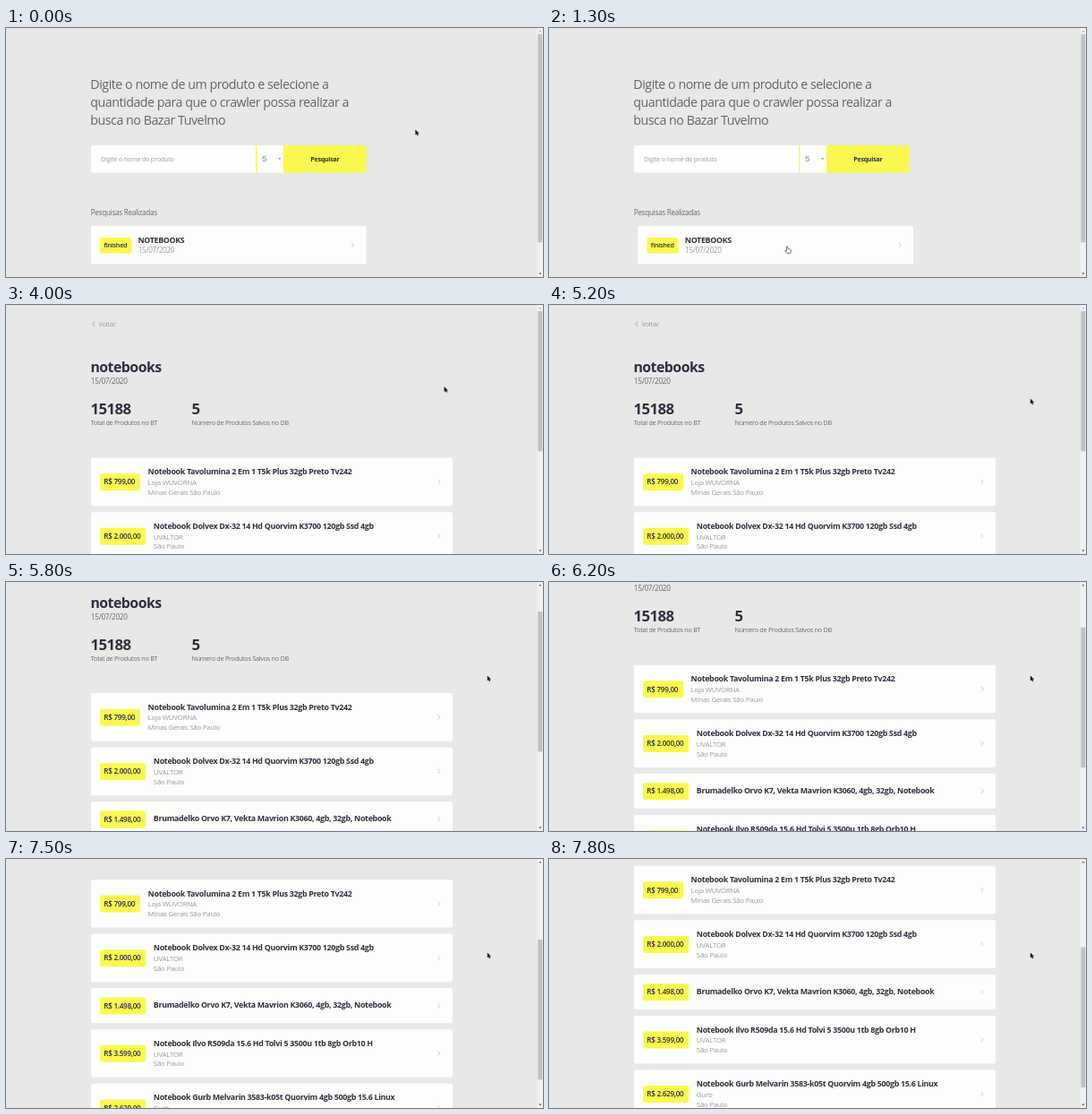
These frames come from a looping animation (600x278 px, 8000 ms). An HTML page:

```html
<!DOCTYPE html>
<html lang="pt-BR">
<head>
<meta charset="utf-8">
<title>Pesquisa de produtos</title>
<style>
  html, body { margin: 0; width: 100%; height: 100%; overflow: hidden; background: #e7e9e6; }
  svg { display: block; width: 100%; height: 100%; }
  text { font-family: "Open Sans", "Noto Sans", sans-serif; white-space: pre; letter-spacing: -.032em; }
</style>
</head>
<body>
<svg id="stage" viewBox="0 0 600 278"></svg>
<script>
const LOOP = 8000, STEP = 100;
const DARK = '#2f2f3d', MID = '#666671', PALE = '#999aa4', YELLOW = '#fcf851', WHITE = '#fcfefb';
const PAGE_SWITCH = 2500, LOADED = 2900, NUDGE = 4.4;

const text = (x, y, size, fill, str, weight = 400) =>
  `<text x="${x}" y="${y}" font-size="${size}" fill="${fill}" font-weight="${weight}">${str}</text>`;
const rect = (x, y, w, h, fill, r = 0) =>
  `<rect x="${x}" y="${y}" width="${w}" height="${h}" rx="${r}" fill="${fill}"/>`;
const chevron = (x, y, dir, color) =>
  `<path d="M${x - dir} ${y - 2.5}l${2.4 * dir} 2.5l${-2.4 * dir} 2.5" fill="none" stroke="${color}" stroke-width=".9"/>`;

function homePage() {
  const title = ['Digite o nome de um produto e selecione a',
    'quantidade para que o crawler possa realizar a', 'busca no Bazar Tuvelmo'];
  return title.map((s, i) => text(94.3, 67.8 + i * 20.2, 14.2, '#636463', s)).join('') +
    rect(95, 131, 220, 30.6, WHITE, 2.2) +
    rect(279, 131, 1.4, 30.6, YELLOW) +
    rect(310, 131, 92.6, 30.6, YELLOW, 2.2) + rect(310, 131, 5, 30.6, YELLOW) +
    text(106, 148.7, 7.24, '#9d9fa5', 'Digite o nome do produto') +
    `<text x="286" y="149.4" font-size="9.8" fill="#8b8c8c" style="font-family:'Liberation Sans',sans-serif">5</text>` +
    '<path d="M304.4 145.2h2.8l-1.4 1.9z" fill="#777"/>' +
    text(340.3, 148.7, 7, DARK, 'Pesquisar', 700) +
    text(94.7, 209.2, 8.1, MID, 'Pesquisas Realizadas') +
    '<g id="search">' + rect(95, 221, 307.6, 42.6, WHITE, 2.2) +
    rect(105, 234, 35.2, 17.4, YELLOW, 2.6) +
    text(109.4, 245, 7.15, DARK, 'finished', 600) +
    text(147.4, 239.9, 8.8, DARK, 'NOTEBOOKS', 700) +
    text(147.7, 251.1, 8.15, PALE, '15/07/2020') +
    chevron(387.3, 242.4, 1, '#c3c4c9') + '</g>';
}

const products = [
  ['799,00', 'Notebook Tavolumina 2 Em 1 T5k Plus 32gb Preto Tv242', 'Loja WUVORNA', 'Minas Gerais São Paulo'],
  ['2.000,00', 'Notebook Dolvex Dx-32 14 Hd Quorvim K3700 120gb Ssd 4gb', 'UVALTOR', 'São Paulo'],
  ['1.498,00', 'Brumadelko Orvo K7, Vekta Mavrion K3060, 4gb, 32gb, Notebook'],
  ['3.599,00', 'Notebook Ilvo R509da 15.6 Hd Tolvi 5 3500u 1tb 8gb Orb10 H', 'UVALTOR', 'São Paulo'],
  ['2.629,00', 'Notebook Gurb Melvarin 3583-k05t Quorvim 4gb 500gb 15.6 Linux', 'Gurb', 'São Paulo']
];

function productCards() {
  let y = 170.6;
  return products.map(([price, name, shop, place], i) => {
    const h = shop ? 53.6 : 39, mid = y + h / 2;
    const w = price.length > 6 ? 51.2 : 45, x = 113.8 + w;
    const card = `<g id="card${i}">` + rect(95, y, 404, h, WHITE, 2.2) +
      rect(105, mid - 9.2, w, 19, YELLOW, 2.8) +
      text(109.3, mid + 3, 8.1, DARK, 'R$ ' + price, 600) +
      text(x - .2, shop ? mid - 8.2 : mid + 2.6, 8.82, DARK, name, 700) +
      (shop ? text(x - .2, mid + 3.5, 7.95, PALE, shop) + text(x - .2, mid + 14.4, 7.95, PALE, place) : '') +
      chevron(483.7, mid, 1, '#c3c4c9') + '</g>';
    y += h + 7;
    return card;
  }).join('');
}

const stage = document.getElementById('stage');
stage.innerHTML = rect(0, 0, 600, 278, '#e7e9e6') +
  `<g id="home">${homePage()}</g>
  <g id="result">
    <g id="back">${chevron(98.2, 21.5, -1, PALE)}${text(103.4, 24.1, 7.6, PALE, 'Voltar')}</g>
    <g id="data">
      ${text(94.4, 75.1, 15.85, DARK, 'notebooks', 700)}
      ${text(94.8, 88.2, 8.2, MID, '15/07/2020')}
      ${text(94.5, 122.3, 16.7, DARK, '15188', 700)}
      ${text(207.6, 122.3, 16.7, DARK, '5', 700)}
      ${text(94.8, 134.2, 7.18, MID, 'Total de Produtos no BT')}
      ${text(207.5, 134.2, 7.18, MID, 'Número de Produtos Salvos no DB')}
      ${productCards()}
    </g>
  </g>
  <g id="bar">
    ${rect(593.6, 0, 6.4, 278, '#f1f2f0')}
    <rect id="thumb" x="594.3" width="5" fill="#c1c2c0"/>
    <path id="up" d="M595.3 4.3l1.5-1.9l1.5 1.9z"/>
    <path d="M595.3 273.6l1.5 1.9l1.5-1.9z" fill="#505050"/>
  </g>
  <circle id="ring" cx="264" cy="246" r="6.6" fill="none" stroke="#c8383c" stroke-width="1"/>
  <path id="arrow" d="M0 0v5l1.2-1.1l.9 2l.9-.4l-.9-1.9h1.6z" fill="#111" stroke="#111" stroke-width=".4"/>
  <path id="hand" d="M-.7 .6q.7-.9 1.4 0v2.6l2.8.6q.9.3.8 1.3l-.6 3h-3.8l-2.5-3q.3-1 1.9.3z" fill="#fff" stroke="#333" stroke-width=".65"/>`;

const el = {};
stage.querySelectorAll('[id]').forEach(n => el[n.id] = n);
const show = (n, on) => n.setAttribute('display', on ? 'inline' : 'none');
const move = (n, x, y) => n.setAttribute('transform', `translate(${x} ${y})`);

const part = (t, a, b) => Math.min(1, Math.max(0, (t - a) / (b - a)));
const smooth = p => p * p * (3 - 2 * p);
const easeOut = p => p * (2 - p);

// [start, end, x, y]
const path = [[550, 1350, 264, 244.8], [3000, 4000, 489.8, 91.6], [4100, 4700, 538, 105]];
// [start, end, wheel ticks]
const wheel = [[5200, 5800, 2], [6050, 6400, 2], [6755, 7200, 2], [7430, 7800, 1]];
const TICK = 23.27;

function cursorAt(t) {
  let x = 457.6, y = 114;
  for (const [a, b, toX, toY] of path) {
    const p = smooth(part(t, a, b));
    x += (toX - x) * p;
    y += (toY - y) * p;
  }
  return [x, y];
}

const hover = (t, enter, leave) =>
  NUDGE * (smooth(part(t, enter, enter + 200)) - smooth(part(t, leave, leave + 200)));

function draw(t) {
  const onHome = t < PAGE_SWITCH, loaded = t >= LOADED;
  const scroll = wheel.reduce((s, [a, b, n]) => s + n * TICK * easeOut(part(t, a, b)), 0);

  show(el.home, onHome);
  show(el.result, !onHome);
  show(el.data, loaded);
  show(el.bar, onHome || loaded);
  move(el.result, 0, -scroll);
  move(el.back, loaded ? 0 : 3.4, 0);
  move(el.search, hover(t, 1080, LOOP), 0);
  move(el.card1, hover(t, LOADED, 3200), 0);
  move(el.card0, hover(t, 3260, 3500), 0);

  el.thumb.setAttribute('y', 6.8 + scroll * .563);
  el.thumb.setAttribute('height', onHome ? 232.5 : 156.5);
  el.up.setAttribute('fill', scroll > 0 ? '#505050' : '#a3a3a3');

  const [x, y] = cursorAt(t);
  const overLink = t >= 1100 && t < 3500;
  show(el.hand, overLink);
  show(el.arrow, !overLink);
  move(el.hand, x, y);
  move(el.arrow, x, y);
  show(el.ring, t >= 2400 && t < 2800);
}

const start = performance.now();
function tick() {
  const t = (performance.now() - start) % LOOP;
  draw(Math.floor(t / STEP) * STEP);
  requestAnimationFrame(tick);
}
tick();
</script>
</body>
</html>
```
